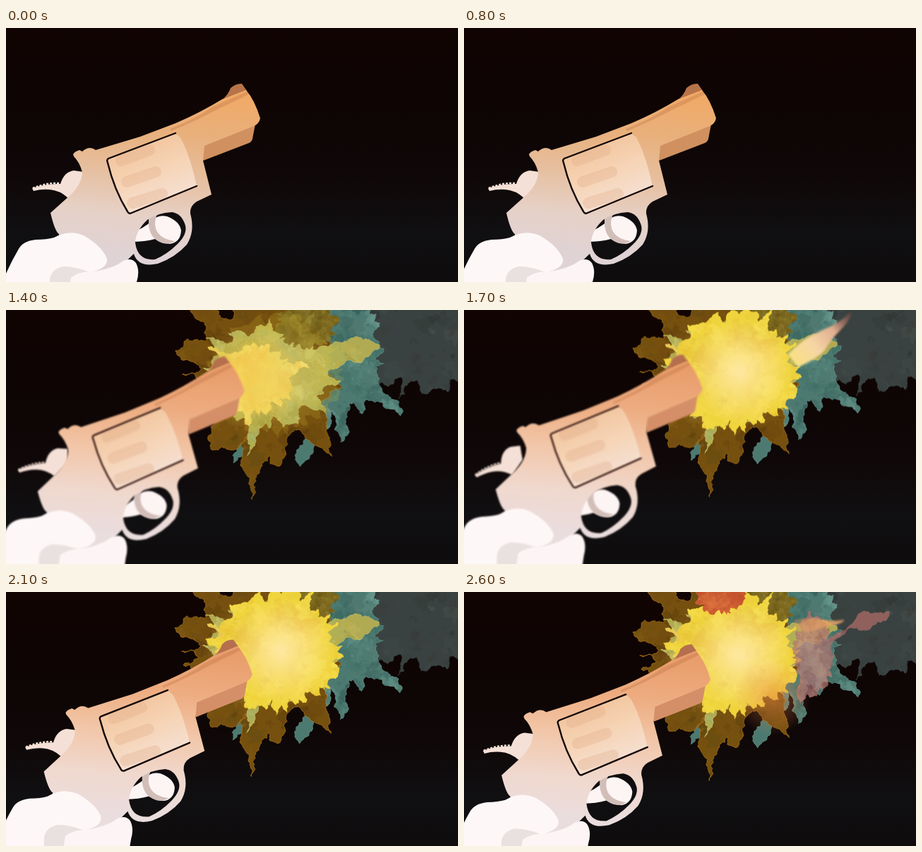
Recreate the animation shown at these times as an HTML page with a canvas. Size 640 px wide and 360 px high, loop 2.7 s.

```html
<!DOCTYPE html>
<html lang="en">
<head>
<meta charset="utf-8">
<title>Revolver</title>
<style>
html, body { margin: 0; width: 100%; height: 100%; overflow: hidden; background: #0f0504; }
canvas { display: block; }
</style>
</head>
<body>
<canvas id="stage" width="640" height="360"></canvas>
<script>
const ctx = document.getElementById('stage').getContext('2d');
const LOOP = 2700, STEP = 100, PAD = 60, SHOTS = [1200, 1700];

let seed = 41;
const rnd = () => (seed = seed * 16807 % 2147483647) / 2147483647;
const ramp = (t, from, to) => {
  const p = Math.min(1, Math.max(0, (t - from) / (to - from)));
  return p * p * (3 - 2 * p);
};

function gradient(c, x0, y0, x1, y1, ...colors) {
  const g = c.createLinearGradient(x0, y0, x1, y1);
  colors.forEach((color, i) => g.addColorStop(i / (colors.length - 1), color));
  return g;
}

// ---- Paint splatter ----
function tear(path, [x0, y0], [x1, y1], amount) {
  const d = Math.hypot(x1 - x0, y1 - y0);
  if (d < 3) return path.lineTo(x1, y1);
  const mid = [(x0 + x1) / 2 + (rnd() - .5) * d * amount, (y0 + y1) / 2 + (rnd() - .5) * d * amount];
  tear(path, [x0, y0], mid, amount);
  tear(path, mid, [x1, y1], amount);
}

function torn(points, amount) {
  const path = new Path2D();
  path.moveTo(...points[0]);
  points.forEach((p, i) => tear(path, p, points[(i + 1) % points.length], amount));
  path.closePath();
  return path;
}

// Ragged ellipse whose outline is drawn out to the given tips.
function burst(x, y, rx, ry, tips, samples = 72) {
  const points = [];
  for (let i = 0; i < samples; i++) {
    const a = i / samples * 2 * Math.PI;
    let r = rx * ry / Math.hypot(ry * Math.cos(a), rx * Math.sin(a)) * (.78 + .3 * rnd());
    for (const [tx, ty] of tips) {
      const off = a - Math.atan2(ty - y, tx - x);
      const away = Math.abs(Math.atan2(Math.sin(off), Math.cos(off))) / .17;
      if (away < 1) r = Math.max(r, Math.hypot(tx - x, ty - y) * (1 - .55 * away));
    }
    points.push([x + r * Math.cos(a), y + r * Math.sin(a)]);
  }
  return torn(points, .45);
}

function layer(x, y, rx, ry, tips, fill, tones, rim) {
  const canvas = document.createElement('canvas');
  canvas.width = 640 + 2 * PAD;
  canvas.height = 360 + 2 * PAD;
  const c = canvas.getContext('2d');
  c.translate(PAD, PAD);
  const outline = burst(x, y, rx, ry, tips);
  c.fillStyle = fill;
  c.fill(outline);
  c.save();
  c.clip(outline);
  for (let i = 0; i < 420; i++) {
    const a = rnd() * 2 * Math.PI, d = Math.sqrt(rnd()) * 1.6, r = 2 + rnd() ** 3 * 22;
    const px = x + d * rx * Math.cos(a), py = y + d * ry * Math.sin(a);
    c.globalAlpha = .1 + rnd() * .25;
    c.fillStyle = tones[i % tones.length];
    c.fill(torn([[px - r, py], [px, py - r], [px + r, py], [px, py + r]], .8));
  }
  c.restore();
  c.globalAlpha = .55;
  c.strokeStyle = rim || fill;
  c.stroke(outline);
  return canvas;
}

const splatter = [
  layer(600, 12, 145, 108, [[558, 130], [612, 120]], '#394240', ['#222524', '#515b58', '#2e3534', '#3a3330']),
  layer(476, 66, 60, 88, [[563, 152], [535, 14], [478, 195], [409, 236], [322, 222]],
    '#4c7a71', ['#2c4f4b', '#76a498', '#35605a', '#58776f'], '#6fa195'),
  layer(366, 92, 110, 114, [[228, 50], [254, -25], [470, -25], [347, 278], [477, 217], [396, 236], [288, 210]],
    '#75500f', ['#4c300a', '#9a6c1c', '#5b4d17', '#6d4512'], '#c98720'),
  layer(375, 92, 88, 74, [[544, 42], [344, 208], [284, 40], [409, 172], [460, 150], [479, 100], [275, 130]],
    '#b0aa52', ['#858433', '#d6d47c', '#9cae70', '#c6b64a'], '#cfc86e'),
  layer(428, 20, 44, 36, [], '#806a1c', ['#604a10', '#9c8832', '#857c34'])
];
const smallCore = layer(352, 98, 56, 52, [[444, 78], [284, 48], [412, 130], [342, 175]],
  '#e9d25a', ['#f8ea8c', '#e3b343', '#cfcf68']);
const bigCore = layer(386, 92, 92, 86, [[482, 132], [442, -4], [272, 76], [300, 152], [345, 14]],
  '#f0d43c', ['#fbe868', '#e3b22c', '#f8e25a', '#dcbd3c']);
const redTop = layer(365, -2, 38, 36, [], '#cf5a31', ['#b8482b', '#de7a42']);
const pinkSide = layer(498, 92, 28, 62, [[612, 23], [475, 168]], '#ad6c66', ['#d59a86', '#8b4f57', '#b98a88']);

function glow(x, y, r, rgb, alpha) {
  const g = ctx.createRadialGradient(x, y, 0, x, y, r);
  g.addColorStop(0, `rgba(${rgb},${alpha})`);
  g.addColorStop(1, `rgba(${rgb},0)`);
  ctx.fillStyle = g;
  ctx.fillRect(x - r, y - r, 2 * r, 2 * r);
}

function streak(x, y, angle, length, width, ...colors) {
  ctx.save();
  ctx.translate(x, y);
  ctx.rotate(angle);
  ctx.scale(length, width);
  ctx.filter = 'blur(1.5px)';
  ctx.fillStyle = gradient(ctx, 0, 0, 1, 0, ...colors);
  ctx.fill(new Path2D('M0 -.4Q.3 -.6 .55 -.3T1 -.15Q.95 .2 .75 .3T.45 .6T0 .5Z'));
  ctx.restore();
}

function drawSplatter(t) {
  if (t < 1000) return;
  const size = Math.min(1, .5 + (t - 1000) / 400);
  const big = ramp(t, 1300, 1700), red = ramp(t, 2100, 2600);
  const put = (image, alpha = 1) => {
    ctx.globalAlpha = alpha;
    ctx.drawImage(image, -PAD, -PAD);
    ctx.globalAlpha = 1;
  };
  ctx.save();
  ctx.translate(335 - 3 * ramp(t, 1200, 1500), 105 - 8 * ramp(t, 1200, 2100) + 6 * ramp(t, 2100, 2600));
  ctx.scale(size, size);
  ctx.translate(-335, -105);
  splatter.forEach(image => put(image));
  put(smallCore);
  glow(352, 100, 70, '255,205,80', .75);
  put(bigCore, big);
  glow(392, 92, 75, '255,232,165', .95 * big);
  put(redTop, red);
  put(pinkSide, red * .75);
  glow(440, 150, 55, '230,130,70', .5 * red);
  streak(470, 48, -.06, 72, 16, `rgba(232,160,90,${red * .3})`, `rgba(234,160,102,${red})`);
  if (Math.abs(t - SHOTS[0]) < 150)
    streak(336, 108, -.3, Math.min(117, 117 + (t - SHOTS[0]) * .4), 28, '#fbd968', '#fbdc9a', '#f8d294');
  if (Math.abs(t - SHOTS[1]) < 150) {
    const far = (t - SHOTS[1]) / 100;
    streak(468 + far * 70, 76 - far * 44, -.66, 108, 26, '#f8e084', '#f6d6a4', '#e0ae90', 'rgba(120,66,66,.5)');
  }
  ctx.restore();
}

// ---- Revolver and hand ----
const shape = d => new Path2D(d);
const body = shape('M95 179Q97 175 104 173L108 175Q118 166 127 173L190 154L240 135Q275 120 306 101L340 88Q352 102 360 128Q358 136 351 139L281 167L279 188L291 236L270 246Q260 252 261 263Q268 288 256 307Q240 325 215 334Q187 340 181 320L150 350L80 350L75 292Q69 288 63 262L92 236Q108 220 108 204Q104 190 96 182ZM183 304Q184 287 200 272Q215 262 235 261Q249 263 254 280Q257 292 243 306Q228 321 211 328Q186 330 183 304Z');
const lug = shape('M278 166L353 136L349 157Q348 161 344 163L279 188Z');
const sight = shape('M306 102Q315 94 318 85Q326 78 334 79L341 89Z');
const rib = shape('M232 143Q270 128 292 112L341 90L344 94L296 117Q270 131 234 146Z');
const cylinder = shape('M143 186L238 149Q246 152 250 161Q262 186 270 224L175 263Q152 228 143 186Z');
const cylinderLine = shape('M240 149L145 185Q142 187 144 191Q153 229 172 260Q174 264 178 262L270 224');
const hammer = shape('M37 227Q58 220 77 221Q82 204 96 202L110 204L108 224L88 241Q76 230 62 229Q50 228 39 231Z');
const spur = shape('M38 227Q58 219 76 220');
const finger = shape('M176 303L178 290Q195 284 207 273Q215 264 228 267Q246 274 248 287Q247 304 232 306Q222 305 211 299Q198 303 176 303Z');
const trigger = shape('M202 264L215 262Q209 274 212 284Q217 299 239 302Q228 309 217 303Q203 296 202 278Z');
const palm = shape('M-40 400L0 348Q8 330 18 313Q24 302 42 300Q58 300 68 297Q89 285 110 294Q136 309 143 327Q145 340 120 346L100 400Z');
const knuckle = shape('M60 400L62 356Q64 342 80 338Q96 337 118 346L100 400Z');
const thumb = shape('M84 400L92 354Q102 345 124 345Q152 341 166 330Q178 325 184 333Q190 344 185 360L178 400Z');

function paint(path, fill, rule = 'nonzero') {
  ctx.fillStyle = fill;
  ctx.fill(path, rule);
}

function drawGun(t) {
  const lit = t >= 1000, blurred = lit && t < 1900;
  const pull = Math.max(0, ...SHOTS.map(shot => 1 - Math.abs(t - shot) / 280));
  const x = -3 * ramp(t, 0, 800) - 17.5 * ramp(t, 800, 1400) + 10 * ramp(t, 1700, 2100);
  const y = -10 * ramp(t, 800, 1700) + 7 * ramp(t, 1900, 2600);
  const turn = -1.7 * ramp(t, 800, 1200) + 1.2 * ramp(t, 1700, 2300);

  ctx.save();
  if (blurred) ctx.filter = 'blur(.9px)';
  ctx.translate(143 + x, 186 + y);
  ctx.rotate(turn * Math.PI / 180);
  ctx.translate(-143, -186);

  ctx.save();
  ctx.translate(95 - 5 * pull, 225);
  ctx.rotate(-.24 * pull);
  ctx.translate(-95, -225);
  paint(hammer, '#f4e0d6');
  ctx.strokeStyle = '#f4e0d6';
  ctx.lineWidth = 2.5;
  ctx.setLineDash([3, 2]);
  ctx.stroke(spur);
  ctx.restore();

  ctx.save();
  ctx.translate(-10 * pull, 0);
  paint(finger, '#fdf5f4');
  paint(trigger, '#d2beb8');
  ctx.restore();

  paint(lug, lit ? '#d48f68' : '#d0905f');
  paint(sight, lit ? '#b56f4e' : '#b87449');
  paint(body, lit
    ? gradient(ctx, 240, 90, 215, 330, '#e99d6b', '#edac80', '#f2c6a8', '#f0d8cd', '#eaddde')
    : gradient(ctx, 240, 90, 215, 330, '#f0aa68', '#e8b07c', '#e6bf9f', '#e6d1c7', '#dfd3d6'), 'evenodd');
  paint(rib, 'rgba(190,112,66,.35)');
  paint(cylinder, gradient(ctx, 190, 165, 222, 245, '#f2c69f', '#f6d4b6', '#f5dfd0'));

  ctx.strokeStyle = 'rgba(220,165,130,.3)';
  ctx.lineWidth = 16;
  ctx.lineCap = 'round';
  for (let i = 0; i < 3; i++) {
    ctx.beginPath();
    ctx.moveTo(163 + i * 8, 188 + i * 30);
    ctx.lineTo(203 + i * 9, 173 + i * 31);
    ctx.stroke();
  }
  ctx.strokeStyle = blurred ? '#3a1c16' : '#120706';
  ctx.lineWidth = 2.4;
  ctx.stroke(cylinderLine);

  paint(palm, '#fef7f7');
  paint(knuckle, '#e8e1df');
  paint(thumb, '#fdf5f5');
  ctx.restore();
}

const backdrop = gradient(ctx, 0, 0, 0, 360, '#110403', '#0e0403', '#0e0505', '#0f0808', '#100f11', '#0e0c0d');

function frame() {
  const t = Math.floor(performance.now() % LOOP / STEP) * STEP;
  ctx.fillStyle = backdrop;
  ctx.fillRect(0, 0, 640, 360);
  drawSplatter(t);
  drawGun(t);
  requestAnimationFrame(frame);
}
frame();
</script>
</body>
</html>
```
